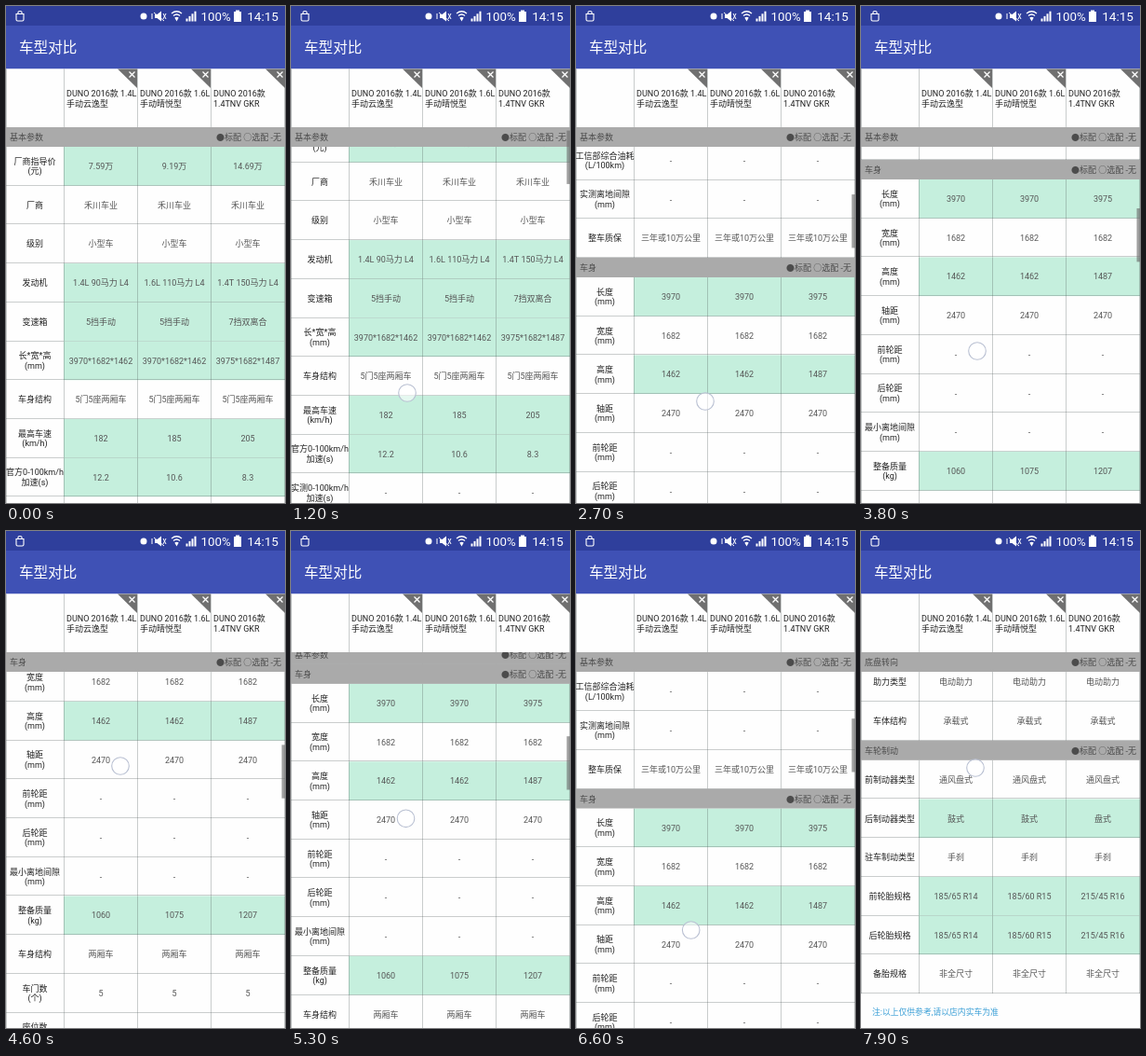
Write an HTML page with a canvas that moves like this. It is 300 px wide and 533 px high and loops after 8 s.

```html
<!DOCTYPE html>
<html lang="zh-CN">
<head>
<meta charset="utf-8">
<style>
html, body { margin: 0; width: 100%; height: 100%; overflow: hidden; background: #fefefe; }
canvas { display: block; width: 300px; height: 533px; }
</style>
</head>
<body>
<canvas id="stage"></canvas>
<script>
const W = 300, H = 533, TOP = 130, BAR = 21, ROW = 41.7, LOOP = 8000;
const FONT = "Roboto, 'Noto Sans CJK SC', 'Noto Sans CJK', sans-serif";
const EDGES = [62.5, 141.5, 220.5], CENTERS = [102, 181, 260];
const LINE = 'rgba(80,90,90,.3)';

const models = [
  ['DUNO 2016款 1.4L', '手动云逸型'],
  ['DUNO 2016款 1.6L', '手动晴悦型'],
  ['DUNO 2016款', '1.4TNV GKR']
];

// Each row: label (~ breaks the line), then one shared value or three values
const sections = Object.entries({
  基本参数: `厂商指导价~(元)|7.59万|9.19万|14.69万
厂商|禾川车业
级别|小型车
发动机|1.4L 90马力 L4|1.6L 110马力 L4|1.4T 150马力 L4
变速箱|5挡手动|5挡手动|7挡双离合
长*宽*高~(mm)|3970*1682*1462|3970*1682*1462|3975*1682*1487
车身结构|5门5座两厢车
最高车速~(km/h)|182|185|205
官方0-100km/h~加速(s)|12.2|10.6|8.3
实测0-100km/h~加速(s)|-
实测100-0km/h~制动(m)|-
实测油耗~(L/100km)|-
工信部综合油耗~(L/100km)|-
实测离地间隙~(mm)|-
整车质保|三年或10万公里`,
  车身: `长度~(mm)|3970|3970|3975
宽度~(mm)|1682
高度~(mm)|1462|1462|1487
轴距~(mm)|2470
前轮距~(mm)|-
后轮距~(mm)|-
最小离地间隙~(mm)|-
整备质量~(kg)|1060|1075|1207
车身结构|两厢车
车门数~(个)|5
座位数~(个)|5
油箱容积~(L)|45
行李厢容积~(L)|-`,
  发动机: `发动机型号|-
排量~(mL)|1398|1598|1395
进气形式|自然吸气|自然吸气|涡轮增压
气缸排列形式|L
气缸数~(个)|4
每缸气门数~(个)|4
压缩比|-
配气机构|DOHC
缸径~(mm)|-
行程~(mm)|-
最大马力~(Ps)|90|110|150
最大功率~(kW)|66|81|110
最大功率转速~(rpm)|5500|5800|5000
最大扭矩~(N·m)|132|155|250
最大扭矩转速~(rpm)|3800|3800|1750-3000
特有技术|-
燃料形式|汽油
燃油标号|92号|92号|95号
供油方式|多点电喷|多点电喷|直喷
缸盖材料|铝
缸体材料|铝
环保标准|国V`,
  变速箱: `简称|5挡手动|5挡手动|7挡双离合
挡位个数|5|5|7
变速箱类型|手动|手动|双离合`,
  底盘转向: `驱动方式|前置前驱
前悬架类型|独立悬架
后悬架类型|非独立悬架
助力类型|电动助力
车体结构|承载式`,
  车轮制动: `前制动器类型|通风盘式
后制动器类型|鼓式|鼓式|盘式
驻车制动类型|手刹
前轮胎规格|185/65 R14|185/60 R15|215/45 R16
后轮胎规格|185/65 R14|185/60 R15|215/45 R16
备胎规格|非全尺寸`
}).map(([name, text]) => ({
  name,
  rows: text.split('\n').map(line => {
    const [label, ...v] = line.split('|');
    return { label: label.split('~'), values: v.length > 1 ? v : [v[0], v[0], v[0]] };
  })
}));

let total = 0;
for (const s of sections) {
  s.top = total;
  total += BAR + s.rows.length * ROW;
}
const footer = total;
total += 37;
const VIEW = H - TOP, END = total - VIEW;

// Tracks of [time, value], joined by straight lines
const scrollTrack = [[1000, 0], [1200, 25], [1500, 130], [1800, 216], [2100, 360], [2400, 470],
  [2600, 500], [2700, 506.5], [3200, 553], [3800, 611.5], [4600, 698], [5000, 684], [5500, 600],
  [6000, 521.5], [6600, 500], [6700, 500], [6900, 800], [7000, 1200], [7200, 1880], [7400, 2320], [7500, END]];
const touchX = [[1800, 125], [2600, 139], [2700, 139], [3800, 125], [4600, 123], [6000, 124], [7900, 123]];
const touchY = [[1000, 440], [1200, 415], [1500, 310], [1700, 256], [1900, 256], [2600, 430], [2700, 424],
  [3800, 370], [4600, 252], [5000, 266], [6000, 407], [6600, 428], [6700, 430], [6800, 390], [7000, 254]];
const touchAlpha = [[900, 0], [1000, 1], [1600, 1], [1800, .35], [1900, 0], [2500, 0], [2600, 1]];
const thumbAlpha = [[900, 0], [1000, 1], [7400, 1], [7600, 0]];

function at(track, t) {
  const i = track.findIndex(p => p[0] > t);
  if (i < 0) return track[track.length - 1][1];
  if (i === 0) return track[0][1];
  const [t0, a] = track[i - 1], [t1, b] = track[i];
  return a + (b - a) * (t - t0) / (t1 - t0);
}

const canvas = document.getElementById('stage');
const c = canvas.getContext('2d');
const dpr = window.devicePixelRatio || 1;
canvas.width = W * dpr;
canvas.height = H * dpr;

function rect(x, y, w, h, color) {
  c.fillStyle = color;
  c.fillRect(x, y, w, h);
}

function text(s, x, y, color, size = 9, align = 'left') {
  c.font = `${size}px ${FONT}`;
  c.textAlign = align;
  c.fillStyle = color;
  c.fillText(s, x, y);
}

function stroke(d, color, width = 1) {
  c.strokeStyle = color;
  c.lineWidth = width;
  c.stroke(new Path2D(d));
}

function fill(d, color) {
  c.fillStyle = color;
  c.fill(new Path2D(d));
}

function columns(y, h) {
  for (const x of [.5, ...EDGES, 299.5]) rect(x - .5, y, 1, h, LINE);
}

function drawBar(name, y) {
  rect(0, y, W, BAR, '#aaaaaa');
  text(name, 4, y + 14, '#4c4c4c');
  text('●标配 ○选配 -无', 296, y + 14, '#4c4c4c', 9, 'right');
}

function drawRow(row, y) {
  const mid = y + ROW / 2 + 3.2;
  if (new Set(row.values).size > 1) rect(62, y, 238, ROW, '#c5efdd');
  row.label.forEach((s, i, all) => text(s, 31, mid + (i - (all.length - 1) / 2) * 10.5, '#222', 9, 'center'));
  row.values.forEach((s, i) => text(s, CENTERS[i], mid, '#555', 9, 'center'));
  columns(y, ROW);
  rect(0, Math.round(y + ROW) - 1, W, 1, LINE);
}

function drawList(scroll) {
  c.save();
  c.beginPath();
  c.rect(0, TOP, W, VIEW);
  c.clip();
  for (const s of sections) {
    const top = TOP + s.top - scroll;
    s.rows.forEach((row, i) => {
      const y = top + BAR + i * ROW;
      if (y < H && y > TOP - ROW) drawRow(row, y);
    });
    drawBar(s.name, top);
  }
  text('注:以上仅供参考,请以店内实车为准', 12, TOP + footer - scroll + 22.5, '#3b9fd6', 8.8);

  // The pinned bar is pushed up by the next one
  const i = sections.findLastIndex(s => s.top <= scroll);
  const next = sections[i + 1];
  drawBar(sections[i].name, TOP + Math.min(0, next ? next.top - scroll - BAR : 0));
  c.restore();
}

function drawStatus() {
  const white = '#fff';
  rect(0, 0, W, 21, '#2f3f9c');
  stroke('M11 8.5H19V14.5Q19 16 17.5 16H12.5Q11 16 11 14.5ZM13 8V6.5Q13 5.5 15 5.5T17 6.5V8', white, 1.1);
  fill('M144.5 11a3.5 3.5 0 1 0 7 0a3.5 3.5 0 1 0-7 0', white);
  fill('M160 9H162.5L167 5.5V16.5L162.5 13H160Z', white);
  stroke('M157 8V14M159 7L170 16M169 8L172 14M172 8L169 14', white, 1);
  stroke('M178 8Q183.500 3.500 189 8M180 10.500Q183.500 7.500 187 10.500', white, 1.3);
  fill('M181.300 12.500Q183.500 10.800 185.700 12.500L183.500 16.500Z', white);
  for (let i = 0; i < 4; i++) rect(193.5 + i * 3, 13.5 - i * 2.6, 2, 3 + i * 2.6, white);
  text('100%', 209.5, 16, white, 13.3);
  rect(247, 4.5, 4, 2, white);
  rect(245, 6, 8, 11, white);
  text('14:15', 293, 16, white, 13.6, 'right');
}

function drawHeader() {
  rect(0, 21, W, 46.5, '#3f51b5');
  text('车型对比', 14, 50, '#fff', 15.6);
  rect(0, 67.5, W, TOP - 67.5, '#fefefe');
  columns(67.5, TOP - 67.5);
  models.forEach((lines, i) => {
    const x = EDGES[i], right = [141, 220, 300][i];
    lines.forEach((s, k) => text(s, x + 2.5, 97 + k * 10.6, '#222'));
    fill(`M${right - 21} 67.500H${right}V88Z`, '#707070');
    const m = right - 5.5;
    stroke(`M${m - 3} 70.500l6 6m0-6l-6 6`, '#fff', 1.3);
  });
}

function drawTouch(t) {
  c.globalAlpha = at(touchAlpha, t);
  c.beginPath();
  c.arc(at(touchX, t), at(touchY, t), 9.3, 0, Math.PI * 2);
  c.fillStyle = 'rgba(255,255,255,.55)';
  c.fill();
  c.strokeStyle = '#b9c0d2';
  c.lineWidth = 1.1;
  c.stroke();
  c.globalAlpha = 1;
}

function frame(now) {
  const t = Math.floor(now % LOOP / 100) * 100;
  const scroll = at(scrollTrack, t);
  c.setTransform(dpr, 0, 0, dpr, 0, 0);
  rect(0, 0, W, H, '#fefefe');
  drawList(scroll);
  drawHeader();
  drawStatus();
  c.globalAlpha = at(thumbAlpha, t);
  rect(296.5, TOP + scroll * VIEW / total, 3.5, VIEW * VIEW / total, 'rgba(110,110,110,.65)');
  drawTouch(t);
  requestAnimationFrame(frame);
}
requestAnimationFrame(frame);
</script>
</body>
</html>
```
